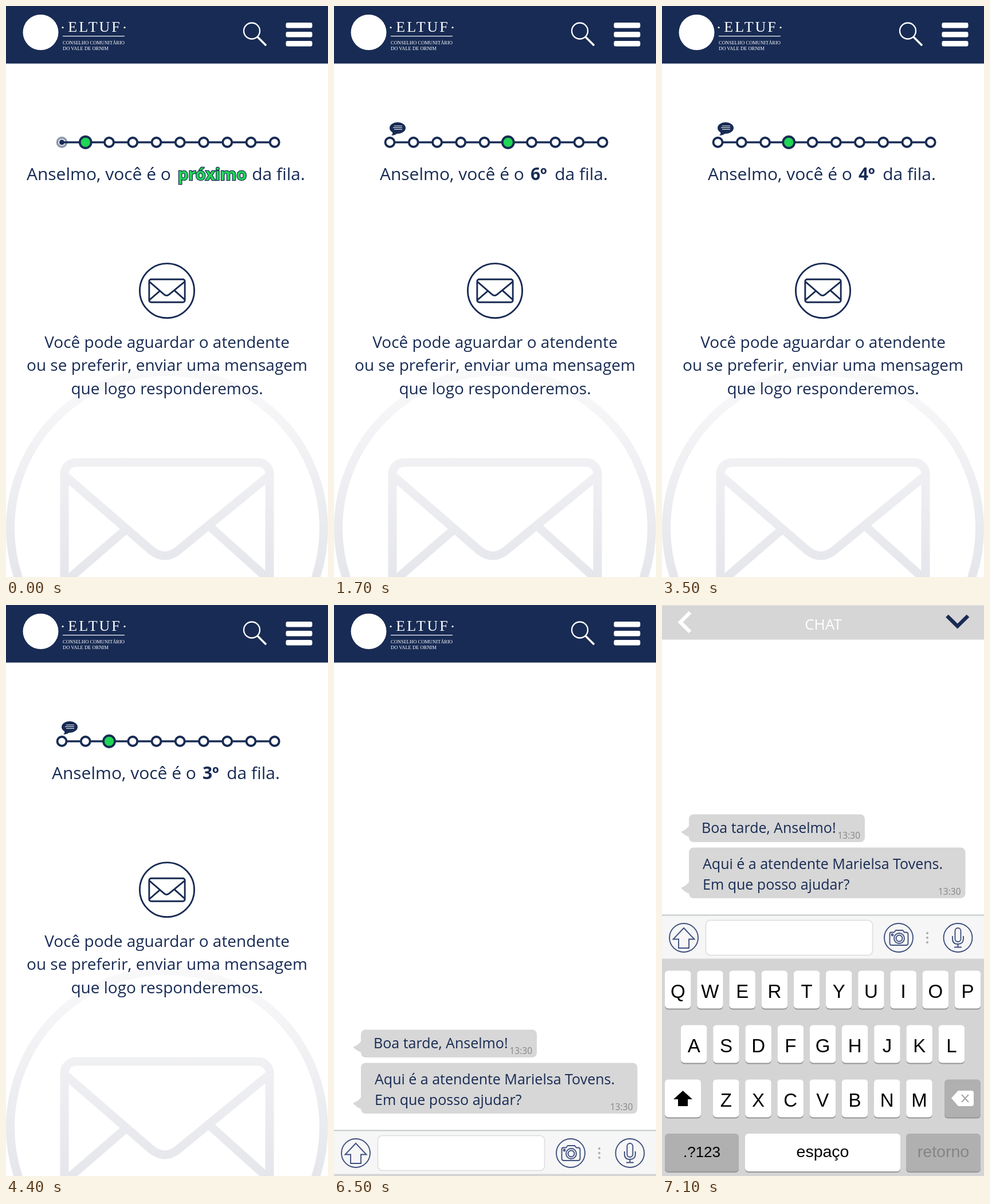
An HTML page for the animation above (7.5 s loop, 562 by 997 pixels).

```html
<!DOCTYPE html>
<html lang="pt-BR">
<head>
<meta charset="utf-8">
<title>Fila de atendimento</title>
<style>
  html, body { margin: 0; width: 100%; height: 100%; overflow: hidden; background: #fff; }
  svg { display: block; width: 100%; height: 100%; }
  text { font-family: "Open Sans", "Noto Sans", sans-serif; font-weight: 400; fill: #182b54; white-space: pre; }
  .logo text { font-family: "Liberation Serif", serif; fill: #fff; }
  .line { font-size: 30px; }
  .info { font-size: 28px; text-anchor: middle; }
  .msg { font-size: 25px; }
  .time { font-size: 15.5px; fill: #858585; text-anchor: end; }
  .keys text { font-family: "Liberation Sans", Arial, sans-serif; fill: #000; text-anchor: middle; }
  .end { text-anchor: end; }
  .bold { font-weight: 700; }
  #next { font-size: 29px; text-anchor: middle; fill: #1fd655; stroke: #182b54; stroke-width: 2.4px; paint-order: stroke; }
</style>
</head>
<body>
<svg viewBox="0 0 562 997" preserveAspectRatio="none">
  <defs>
    <linearGradient id="fade" gradientUnits="userSpaceOnUse" x1="0" y1="-281" x2="0" y2="85">
      <stop offset="0" stop-color="#f9f9fa"/><stop offset="1" stop-color="#e5e6eb"/>
    </linearGradient>
    <g id="mail" fill="none">
      <circle r="273.5"/>
      <rect x="-179" y="-115" width="358" height="230" rx="20"/>
      <path d="M-176-90L-28 38Q-4 58 20 38L176-90M-74 4L-176 92M76-2L176 88"/>
    </g>
  </defs>
  <rect width="562" height="997" fill="#fff"/>

  <g id="wait">
    <use href="#mail" transform="translate(281 912)" stroke="url(#fade)" stroke-width="15"/>
    <use href="#mail" transform="translate(281 497.2) scale(.174)" stroke="#182b54" stroke-width="16.5"/>
    <text class="info" x="281" y="597">Você pode aguardar o atendente</text>
    <text class="info" x="281" y="637">ou se preferir, enviar uma mensagem</text>
    <text class="info" x="281" y="678">que logo responderemos.</text>
    <g id="queue"></g>
    <g id="talk">
      <ellipse cx="111" cy="213" rx="14" ry="10" fill="#182b54"/>
      <path d="M101 218Q104 223 100 226Q107 226 111 222Z" fill="#182b54"/>
      <path d="M105 209.5H119M103 212.5H119M105 215.5H119" stroke="#fff"/>
    </g>
    <text id="lead" class="line end" y="304">Anselmo, você é o</text>
    <text id="place" class="line bold" x="343" y="304"></text>
    <text id="next" class="bold" x="360" y="304">próximo</text>
    <text id="tail" class="line end" y="304">da fila.</text>
  </g>

  <g id="chat">
    <rect y="100.5" width="562" height="897" fill="#fff"/>
    <g id="talks">
      <path d="M48 760Q45 767 33 772Q42 780 48 781ZM48 858Q45 865 33 870Q42 879 48 880Z" fill="#d7d7d7"/>
      <rect x="47" y="741.5" width="307" height="48.5" rx="8" fill="#d7d7d7"/>
      <rect x="47" y="799.5" width="482.5" height="88.5" rx="8" fill="#d7d7d7"/>
      <text class="msg" x="69" y="774">Boa tarde, Anselmo!</text>
      <text class="time" x="346" y="784">13:30</text>
      <text class="msg" x="71" y="837">Aqui é a atendente Marielsa Tovens.</text>
      <text class="msg" x="71" y="873">Em que posso ajudar?</text>
      <text class="time" x="521.5" y="882">13:30</text>
    </g>
    <g id="dock">
      <rect y="917" width="562" height="77" fill="#f6f6f7"/>
      <rect y="916.5" width="562" height="2" fill="#c3c8cb"/>
      <rect x="76.5" y="926.5" width="291" height="61" rx="8" fill="#fff" stroke="#dcdcdc" stroke-width="1.5"/>
      <g fill="none" stroke="#3f507e" stroke-width="1.9">
        <circle cx="38" cy="957" r="25"/><circle cx="413" cy="957" r="25"/><circle cx="516.5" cy="957" r="25"/>
        <path d="M38 940L19.5 959.5H29V975H47V959.5H56.5Z"/>
        <path d="M400 947.5H405L408 944H420L423 947.5H426Q429.5 947.5 429.5 951V966Q429.5 970 426 970H401Q397.5 970 397.5 966V951Q397.5 947.5 400 947.5Z"/>
        <circle cx="414" cy="958" r="9"/><circle cx="414" cy="958" r="5.5"/><circle cx="402" cy="952" r="1.5"/>
        <rect x="511.5" y="940" width="10" height="24" rx="5"/>
        <path d="M507 954V959Q507 968 516.5 968T526 959V954M516.5 968V973M510 973.5H523"/>
      </g>
      <g fill="#a9abae"><circle cx="463" cy="949" r="2"/><circle cx="463" cy="957" r="2"/><circle cx="463" cy="965" r="2"/></g>
      <g id="keys" class="keys" transform="translate(0 376)"></g>
    </g>
  </g>

  <g id="bar">
    <rect y=".5" width="562" height="60" fill="#d6d6d6"/>
    <path d="M49 13L32 30L49 47" fill="none" stroke="#fff" stroke-width="6.5"/>
    <text x="281.5" y="43" text-anchor="middle" style="fill:#fff;font-size:26px">CHAT</text>
    <path id="down" d="M497.5 19L515.7 37L534 19" fill="none" stroke="#182b54" stroke-width="6.5"/>
  </g>

  <g id="head">
    <rect width="562" height="100.5" fill="#182b54"/>
    <g class="logo" fill="#fff">
      <circle cx="60.5" cy="46" r="31"/>
      <circle cx="99" cy="37.5" r="1.6"/><circle cx="207" cy="37.5" r="1.6"/>
      <text x="155" y="45" text-anchor="middle" style="font-size:26px;letter-spacing:3px">ELTUF</text>
      <rect x="99" y="52" width="108" height="1.2"/>
      <text x="99" y="67" style="font-size:8.5px">CONSELHO COMUNITÁRIO</text>
      <text x="99" y="77" style="font-size:8.5px">DO VALE DE ORNIM</text>
    </g>
    <circle cx="429" cy="43.5" r="14" fill="none" stroke="#fff" stroke-width="2.3"/>
    <path d="M439 54L454 69" stroke="#fff" stroke-width="3.6"/>
    <g fill="#fff">
      <rect x="488.5" y="29" width="46" height="9.5" rx="3"/>
      <rect x="488.5" y="45" width="46" height="9.5" rx="3"/>
      <rect x="488.5" y="61" width="46" height="9.5" rx="3"/>
    </g>
  </g>
</svg>
<script>
const NAVY = '#182b54', GREEN = '#1fd655', LOOP = 7500, STEP = 41.25, X0 = 97.5, ROW = 238;
const $ = id => document.getElementById(id);
const show = (id, on) => $(id).setAttribute('display', on ? 'inline' : 'none');
const shift = (id, y) => $(id).setAttribute('transform', `translate(0 ${y})`);
const clamp = (v, lo, hi) => Math.min(hi, Math.max(lo, v));

function key(x, y, w, label, size = 33, fill = '#fff', ink = '#000') {
  const base = y + (size > 30 ? 47 : 41);
  return `<rect x="${x}" y="${y + 2}" width="${w}" height="66" rx="6" fill="#949596"/>
    <rect x="${x}" y="${y}" width="${w}" height="66" rx="6" fill="${fill}"/>
    <text x="${x + w / 2}" y="${base}" font-size="${size}" style="fill:${ink}">${label}</text>`;
}

function keyboard() {
  const row = (letters, x, y) => [...letters].map((c, i) => key(x + 56.2 * i, y, 45.5, c)).join('');
  return '<rect y="617.5" width="562" height="380" fill="#d4d4d4"/>' +
    row('QWERTYUIOP', 5, 638.5) + row('ASDFGHJKL', 33, 733.5) + row('ZXCVBNM', 89, 828.5) +
    key(5, 828.5, 63, '') + key(493, 828.5, 63, '', 28, '#b0b0b0') +
    '<path d="M36.5 848L53 863H45V875H28V863H20Z"/>' +
    '<path d="M505 861L517 848H540Q544 848 544 852V871Q544 875 540 875H517Z" fill="#fff"/>' +
    '<path d="M523 855L535 868M535 855L523 868" stroke="#a5a5a5" stroke-width="2"/>' +
    key(5, 923, 129, '.?123', 26, '#b0b0b0') + key(145, 923, 271, 'espaço', 28.5) +
    key(426, 923, 130, 'retorno', 28.5, '#b0b0b0', '#858585');
}

function dot(x, opacity = 1, green = false) {
  return `<circle cx="${x}" cy="${ROW}" r="${green ? 10 : 8}" fill="${green ? GREEN : '#fff'}"
    stroke="${NAVY}" stroke-width="3.8" opacity="${opacity}"/>`;
}

// s: slide progress, target: slot of the green dot, leaving: first slot is being freed
function queue(s, target, leaving) {
  const at = i => X0 + STEP * (i + 1 - s);
  const line = `<path d="M${X0} ${ROW}H${X0 + 9 * STEP}" stroke="${NAVY}" stroke-width="3.6"/>`;
  const gone = s < 1 ? dot(at(-1), 0.48 * Math.max(0, 1 - s / 0.75)) : '';
  const freed = s === 1 && leaving;
  let dots = dot(X0 + 9 * STEP, s);
  for (let i = freed ? 1 : 0; i < 9; i++) if (i !== target) dots += dot(at(i));
  const hub = `<circle cx="${X0}" cy="${ROW}" r="4.5" fill="${NAVY}"/>`;
  const ring = freed ? dot(X0, 0.48) : gone;
  return ring + line + (freed || s < 1 ? hub : '') + dots + dot(at(target), 1, true);
}

function drawWait(tick) {
  const time = tick < 3 ? 53 : Math.min(tick, 53);
  const phase = Math.floor(time / 9), u = time % 9;
  const last = phase === 5, leaving = last && u >= 7;
  $('queue').innerHTML = queue(Math.min(1, u / 4), 6 - phase, leaving);
  show('talk', u >= 5 && !leaving);
  show('next', last);
  show('place', !last);
  $('place').textContent = `${7 - phase}º`;
  $('lead').setAttribute('x', last ? 288 : 332);
  $('tail').setAttribute('x', last ? 522 : 478);
}

function drawChat(tick) {
  const n = clamp(tick - 65, 0, 6);
  const lift = Math.min(376, 63 * n);
  const hidden = 81 * (1 - clamp((tick - 62) / 3, 0, 1));
  $('chat').setAttribute('opacity', clamp((tick - 53) / 4, 0, 1));
  shift('talks', -lift);
  shift('dock', hidden - lift);
  shift('head', -Math.min(102, 22 * n));
  shift('bar', Math.max(0, 102 - 22 * n));
  show('bar', n > 0);
  show('down', n === 6);
}

function draw(ms) {
  const tick = Math.floor((ms % LOOP) / 100);
  show('wait', tick < 57);
  show('chat', tick >= 54);
  drawWait(tick);
  drawChat(tick);
}

$('keys').innerHTML = keyboard();
const start = performance.now();
function loop() {
  draw(performance.now() - start);
  requestAnimationFrame(loop);
}
loop();
</script>
</body>
</html>
```
